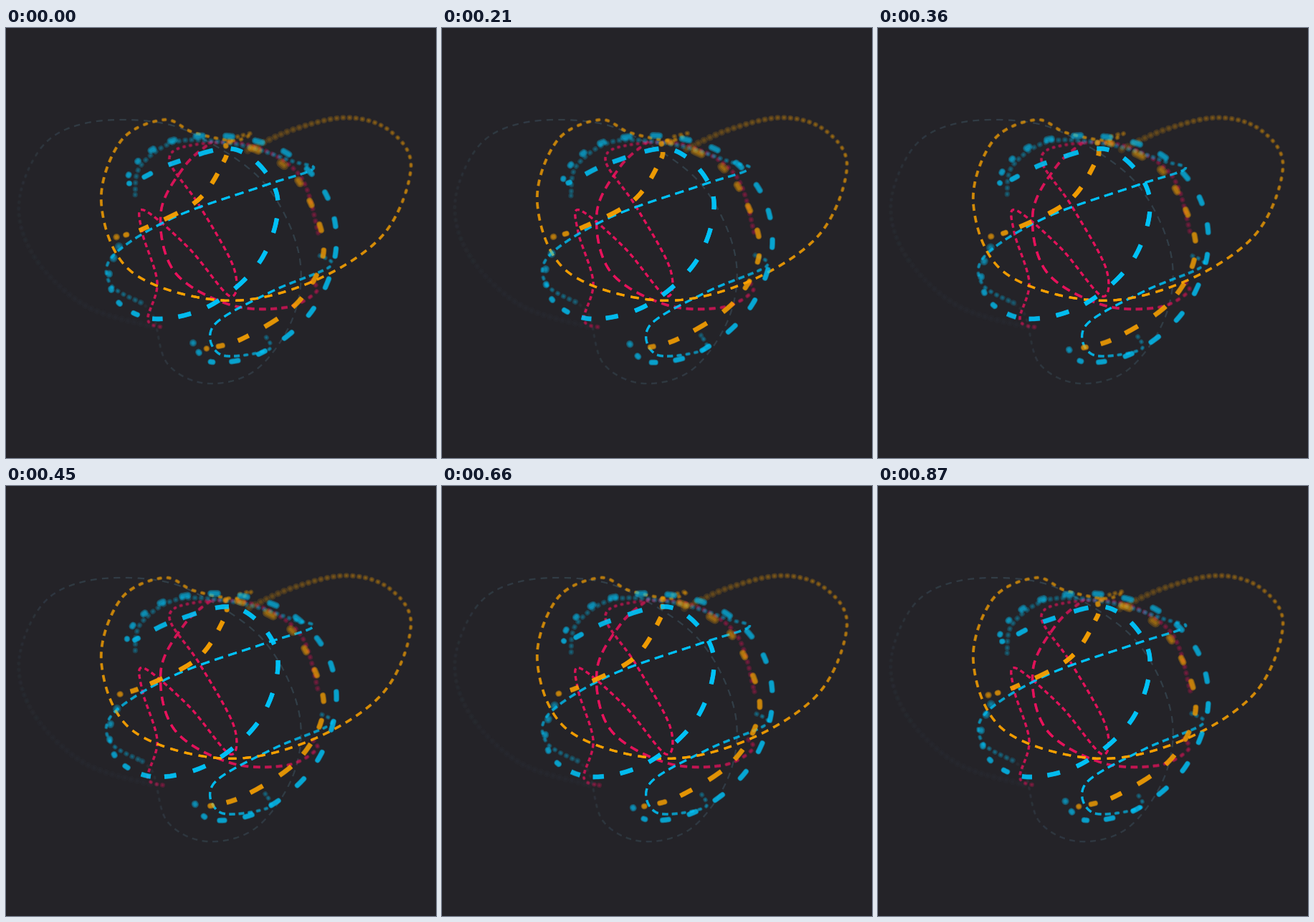
Write an HTML page with a canvas that moves like this. It is 600 by 600 pixels and loops after 900 ms.

```html
<!DOCTYPE html>
<html>
<head>
<meta charset="utf-8">
<style>
  html, body { margin: 0; height: 100%; overflow: hidden; background: #242328; }
  canvas { display: block; }
</style>
</head>
<body>
<canvas width="600" height="600"></canvas>
<script>
const ctx = document.querySelector('canvas').getContext('2d');
const LOOP = 900, STEPS = 20;
const BLUE = '#00c8ff', ORANGE = '#ffa500', PINK = '#f2125f', GREY = '#35424c';
const strands = [];

const mix = (a, b, t) => a.map((v, i) => v + (b[i] - v) * t);

// Catmull-Rom between b and c
const spline = (a, b, c, d, t) =>
  b + t / 2 * (c - a + t * (2 * a - 5 * b + 4 * c - d + t * (3 * (b - c) + d - a)));

// Keys are [x, y, blur]. Dashes are either a fixed count per key (perKey)
// or a pixel period that shrinks where the strand recedes out of focus.
function strand({ color, width, cycles, fill, period, perKey }, keys) {
  const key = i => keys[Math.max(0, Math.min(keys.length - 1, i))];
  const raw = [];
  for (let i = 0; i < (keys.length - 1) * STEPS; i++) {
    const k = Math.floor(i / STEPS), t = i % STEPS / STEPS;
    const [a, b, c, d] = [-1, 0, 1, 2].map(o => key(k + o));
    const [x, y] = [0, 1].map(j => spline(a[j], b[j], c[j], d[j], t));
    const blur = b[2] + (c[2] - b[2]) * t;
    const [px, py, , pu] = raw[i - 1] || [x, y, 0, 0];
    const u = perKey ? i / STEPS * perKey
      : pu + Math.hypot(x - px, y - py) / Math.max(9, period / (1 + blur / 2));
    raw.push([x, y, blur, u]);
  }
  // resample evenly in dash units
  const samples = [], length = raw[raw.length - 1][3];
  for (let u = 0, j = 0; u <= length; u += 1 / STEPS) {
    while (j < raw.length - 2 && raw[j + 1][3] < u) j++;
    samples.push(mix(raw[j], raw[j + 1], (u - raw[j][3]) / (raw[j + 1][3] - raw[j][3])));
  }
  strands.push({ color, width, cycles, fill, samples, end: (samples.length - 1) / STEPS });
}

function at(samples, u) {
  const f = u * STEPS, i = Math.min(Math.floor(f), samples.length - 2);
  return mix(samples[i], samples[i + 1], f - i);
}

function drawDash({ color, width, samples }, from, to) {
  const blur = at(samples, (from + to) / 2)[2];
  const [[x0, y0], [x1, y1]] = [at(samples, from), at(samples, to)];
  const soft = blur > 1;
  // leave room for the round caps
  const trim = soft ? Math.min(0.45, (width + blur) / 2 / Math.hypot(x1 - x0, y1 - y0)) : 0;
  ctx.beginPath();
  for (let i = 0; i <= 6; i++) {
    const t = trim + (1 - 2 * trim) * i / 6;
    const [x, y] = at(samples, from + (to - from) * t);
    ctx.lineTo(x, y);
  }
  ctx.strokeStyle = color;
  ctx.lineCap = soft ? 'round' : 'butt';
  ctx.globalAlpha = 1 - Math.cbrt(1 - width / (width + blur * 1.3));
  // stacked widths give a soft edge
  for (const spread of [-0.5, 0.5, 1.5]) {
    ctx.lineWidth = Math.max(width * 0.4, width + blur * spread);
    ctx.stroke();
  }
}

function draw() {
  const t = performance.now() % LOOP / LOOP;
  ctx.globalAlpha = 1;
  ctx.fillStyle = '#242328';
  ctx.fillRect(0, 0, 600, 600);
  for (const s of strands) {
    for (let k = -1 + t * s.cycles % 1; k < s.end + 1; k++) {
      const from = Math.max(0, k - s.fill / 2), to = Math.min(s.end, k + s.fill / 2);
      if (to > from) drawDash(s, from, to);
    }
  }
  requestAnimationFrame(draw);
}

strand({ color: GREY, width: 2, cycles: 1, fill: 0.55, period: 19 }, [
  [205, 417, 5], [110, 387, 5], [40, 320, 4], [18, 245, 2.5], [50, 166, 0.8], [110, 133, 0.4],
  [200, 130, 0.2], [270, 152, 0.2], [360, 216, 0.2], [408, 312, 0.2], [402, 400, 0.3],
  [350, 476, 0.5], [281, 496, 0.6], [225, 468, 0.8], [205, 400, 2], [180, 380, 3]
]);

strand({ color: PINK, width: 3, cycles: 1, fill: 0.58, period: 12.5 }, [
  [436, 287, 3], [410, 206, 2.8], [342, 164, 2.6], [262, 163, 1.6], [228, 184, 0.8],
  [270, 248, 0.2], [318, 335, 0.2], [312, 374, 0.2], [255, 307, 0.2], [192, 254, 0.3],
  [190, 285, 0.3], [211, 355, 0.3], [198, 407, 1], [221, 418, 3]
]);

strand({ color: PINK, width: 3.3, cycles: 1, fill: 0.6, period: 22 }, [
  [288, 158, 1.5], [249, 193, 0.5], [216, 258, 0.2], [235, 340, 0.1], [312, 386, 0.4],
  [390, 390, 1], [433, 368, 2], [426, 352, 3]
]);

strand({ color: BLUE, width: 3, cycles: 3, fill: 0.62, period: 21 }, [
  [180, 234, 3], [188, 192, 3], [240, 158, 3], [325, 163, 3], [400, 186, 2.5], [428, 197, 0.8],
  [360, 220, 0.1], [235, 264, 0.1], [150, 317, 1], [146, 358, 2], [192, 385, 3.5]
]);

strand({ color: BLUE, width: 3, cycles: 3, fill: 0.62, period: 19 }, [
  [437, 317, 3], [452, 333, 1.2], [370, 368, 0.2], [290, 415, 0.2], [300, 456, 0.5],
  [366, 449, 1.6], [361, 428, 3]
]);

strand({ color: ORANGE, width: 3.2, cycles: 1, fill: 0.56, period: 21 }, [
  [322, 152, 2.5], [343, 147, 2.5], [318, 157, 1.6], [262, 146, 1.2], [220, 128, 1.2],
  [160, 158, 0.9], [133, 245, 0.6], [175, 340, 0.2], [300, 380, 0], [420, 357, 0.2],
  [525, 290, 0.6], [565, 195, 1.5], [535, 143, 2.3], [475, 125, 3], [400, 142, 4], [335, 172, 5]
]);

strand({ color: ORANGE, width: 6, cycles: 1, fill: 0.44, perKey: 2 }, [
  [153, 292, 2.5], [192, 280, 0.5], [268, 240, 0.3], [306, 182, 0.5], [312, 158, 2.5],
  [386, 190, 4.5], [425, 244, 2.2], [443, 314, 1.4], [407, 383, 0.8], [331, 433, 0.6],
  [277, 448, 2]
]);

strand({ color: BLUE, width: 6, cycles: 3, fill: 0.43, perKey: 2 }, [
  [158, 304, 4], [144, 343, 2.8], [158, 384, 1.6], [211, 406, 0.6], [289, 385, 0.2],
  [358, 320, 0.2], [378, 232, 0.2], [322, 170, 0.4], [235, 188, 0.7], [172, 217, 1.5],
  [184, 186, 2.5], [232, 157, 2.8], [311, 151, 2.6], [391, 174, 2.4], [447, 233, 1.7],
  [460, 313, 1.2], [426, 396, 1.1], [357, 453, 1.2], [287, 466, 1.5], [260, 438, 3]
]);

draw();
</script>
</body>
</html>
```
